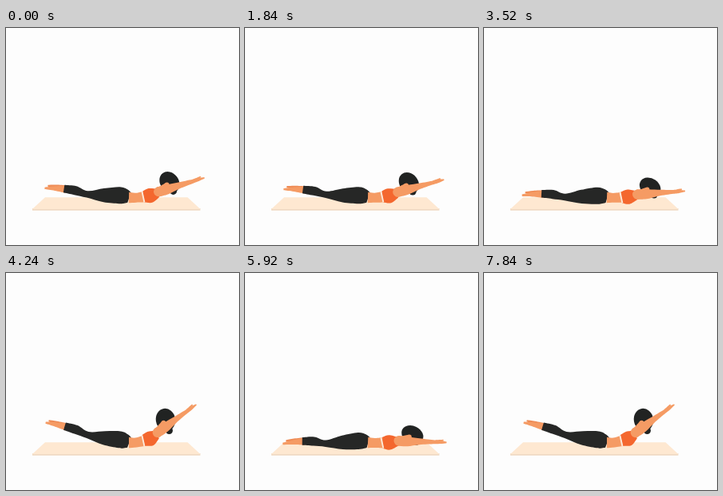
Animation, 292 px wide and 272 px high, one loop 8 s. Source, as an HTML page with a canvas:

```html
<!DOCTYPE html>
<html lang="en">
<head>
<meta charset="utf-8">
<title>Back extension</title>
<style>
html, body { margin: 0; width: 100%; height: 100%; overflow: hidden; background: #fdfdfd; }
canvas { display: block; width: 292px; height: 272px; }
</style>
</head>
<body>
<canvas id="stage"></canvas>
<script>
const W = 292, H = 272, LOOP = 8000, STEP = 80;
const SKIN = '#f59b64', SHADE = '#ee8b55', PANTS = '#262726', HAIR = '#212322', TOP = '#f4672e';
const canvas = document.getElementById('stage');
const scale = window.devicePixelRatio || 1;
canvas.width = W * scale;
canvas.height = H * scale;
const ctx = canvas.getContext('2d');

const mix = (a, b, p) => a + (b - a) * p;
const clamp = v => Math.min(1, Math.max(0, v));
const rise = (t, start) => 1 - Math.pow(1 - clamp((t - start) / 820), 1.85);
const fall = (t, start) => {
  const u = clamp((t - start) / 1500);
  return 1 - u * u * (3 - 2 * u);
};

// Height of the pose: 0 lying flat, 1 fully raised.
function lift(t) {
  if (t < 1100) return rise(t, -290);
  if (t < 3400) return fall(t, 1100);
  if (t < 4730) return rise(t, 3400);
  if (t < 7030) return fall(t, 4730);
  return rise(t, 7030);
}

function curveThrough(pts) {
  const at = i => pts[Math.min(pts.length - 1, Math.max(0, i))];
  ctx.lineTo(...pts[0]);
  for (let i = 0; i < pts.length - 1; i++) {
    const [a, b, c, d] = [at(i - 1), at(i), at(i + 1), at(i + 2)];
    ctx.bezierCurveTo(
      b[0] + (c[0] - a[0]) / 6, b[1] + (c[1] - a[1]) / 6,
      c[0] - (d[0] - b[0]) / 6, c[1] - (d[1] - b[1]) / 6, ...c);
  }
}

// Smooth limb along [x, y, radius] nodes, with flat ends.
function tube(color, ...nodes) {
  const edge = sign => nodes.map(([x, y, r], i) => {
    const a = nodes[Math.max(0, i - 1)], b = nodes[Math.min(nodes.length - 1, i + 1)];
    const dx = b[0] - a[0], dy = b[1] - a[1], k = sign * r / Math.hypot(dx, dy);
    return [x - dy * k, y + dx * k];
  });
  ctx.fillStyle = color;
  ctx.beginPath();
  curveThrough(edge(-1));
  curveThrough(edge(1).reverse());
  ctx.fill();
}

function oval(color, x, y, rx, ry = rx, angle = 0) {
  ctx.fillStyle = color;
  ctx.beginPath();
  ctx.ellipse(x, y, rx, ry, angle, 0, Math.PI * 2);
  ctx.fill();
}

function trapezoid(color, top, bottom, inset) {
  ctx.fillStyle = color;
  ctx.beginPath();
  ctx.moveTo(33 + inset, top);
  ctx.lineTo(243.5 - inset, top);
  ctx.lineTo(243.5, bottom);
  ctx.lineTo(33, bottom);
  ctx.fill();
}

function drawMat() {
  trapezoid('#f0dac3', 226, 228.7, 0);
  trapezoid('#fee8d1', 212.3, 227, 16);
}

function drawLegs(p) {
  // The legs bend upward more strongly the farther they are from the hip.
  const raise = ([x, y, r]) => {
    const reach = Math.max(0, (154 - x) / 82);
    return [x + 2 * p * reach, y - 21 * p * Math.pow(reach, 1.3), r];
  };
  const leg = (color, ...nodes) => tube(color, ...nodes.map(raise));
  leg(SHADE, [51, 213.5, 1], [61, 212.5, 2.2], [74, 212.5, 4]);
  leg(SKIN, [47, 217.3, 1.2], [60, 215, 2.8], [74, 213.5, 4.5]);
  leg(PANTS, [71.5, 213.2, 4.8], [86, 212.8, 5.6], [101, 215, 4.2],
    [122, 213, 8.6], [142, 210.6, 10.5], [150, 211.2, 9], [154.5, 212.5, 6.7]);
}

function drawTorso(p) {
  const spine = mix(213, 210, p);
  tube(SKIN, [154, 212.5, 6.7], [163, mix(213, 212.5, p), 6], [174, spine, 7]);
  tube(TOP, [172.5, spine, 7], [181, mix(213, 207.5, p), 9.2], [mix(192, 189, p), mix(212, 202.5, p), 5.5]);
  tube('#fdeadb', [171, spine + 0.4, 6.8], [172.8, spine, 6.9]);
}

function drawHead(p, shoulderX, shoulderY) {
  oval(HAIR, mix(211, 200, p), mix(205, 184, p), 14.2, mix(10.8, 12.2, p), mix(0.35, 1.4, p));
  oval(HAIR, mix(216, 204.5, p), mix(213, 197.5, p), 4.5);
  const earX = mix(207, 197.5, p), earY = mix(207.5, 187.5, p);
  tube(SKIN, [shoulderX, shoulderY, 5], [earX, earY, 2.8]);
  oval(SKIN, earX, earY, 2.8);
}

function drawArm(p, x, y) {
  ctx.save();
  ctx.translate(x, y);
  ctx.rotate(mix(0.116, -0.624, p));
  oval(SKIN, 1, 0, 6.2);
  tube(SKIN, [0, 0, 6.2], [12, 0.5, 6], [27, 0, 4], [46, 0, 2.4], [53, 0, 2], [61, 0, 0.8]);
  tube(SKIN, [47, -1, 1.4], [57, -2.6, 0.8]);
  ctx.restore();
}

function frame() {
  const t = Math.floor(performance.now() % LOOP / STEP) * STEP;
  const p = lift(t);
  const shoulder = [mix(192, 189, p), mix(211.5, 200.5, p)];
  ctx.setTransform(scale, 0, 0, scale, 0, 0);
  ctx.fillStyle = '#fdfdfd';
  ctx.fillRect(0, 0, W, H);
  drawMat();
  drawLegs(p);
  drawTorso(p);
  drawHead(p, ...shoulder);
  drawArm(p, ...shoulder);
  requestAnimationFrame(frame);
}
frame();
</script>
</body>
</html>
```
